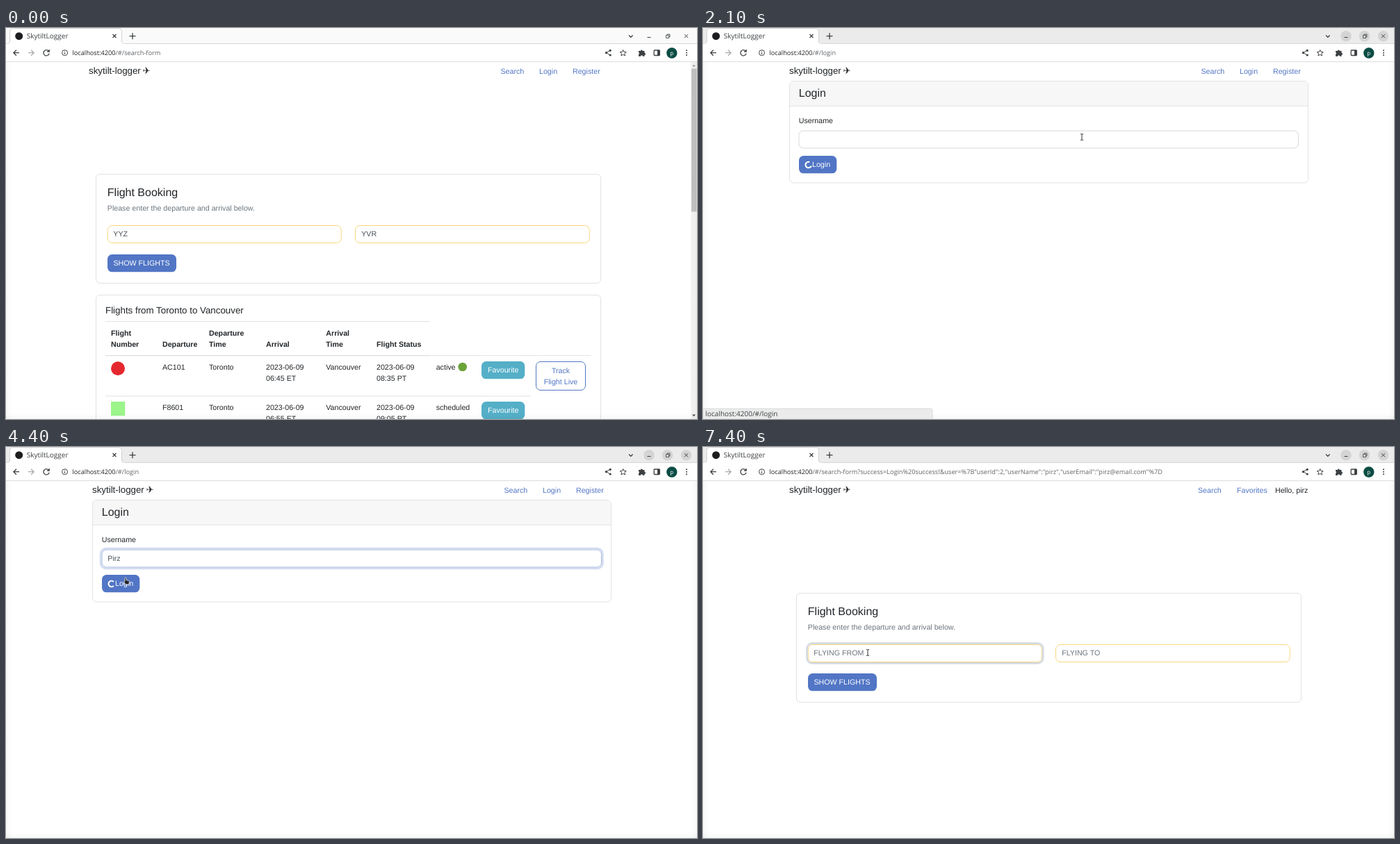
Recreate the animation shown at these times as an HTML page. Size 994 by 563 pixels, loop 8000 ms.

```html
<!DOCTYPE html>
<html lang="en">
<head>
<meta charset="utf-8">
<title>SkytiltLogger</title>
<style>
  html, body { margin: 0; width: 100%; height: 100%; overflow: hidden; background: #fff; }
  svg { display: block; }
  text { font: 10.667px "Liberation Sans", Arial, sans-serif; fill: #212529; white-space: pre; text-rendering: geometricPrecision; }
  .b { font-weight: 700; }
  .h4 { font-size: 16px; }
  .h5 { font-size: 13.333px; }
  .plane { font: 13.333px "DejaVu Sans", sans-serif; }
  .link { fill: #5276c5; }
  .link.on { fill: #32487a; }
  .muted { fill: #6c757d; }
  .field { fill: #495057; }
  .white { fill: #fff; }
  .mid { text-anchor: middle; }
  .ui { font: 10px "Open Sans", "Noto Sans", sans-serif; fill: #3c4043; }
  .url { font-size: 9.2px; fill: #5f6368; }
  .host { fill: #202124; }
  .ico { fill: none; stroke: #3c4043; stroke-width: 1.3; }
</style>
</head>
<body>
<svg id="stage" width="994" height="563" viewBox="0 0 994 563"></svg>
<script>
const LOOP = 8000, STEP = 100, BLUE = '#5276c5', LINE = '#dfe2e6';

const esc = s => s.replace(/&/g, '&amp;');
const text = (x, y, s, cls = '', more = '') => `<text x="${x}" y="${y}" class="${cls}" ${more}>${esc(s)}</text>`;
const box = (x, y, w, h, r, fill, stroke = 'none', more = '') =>
  `<rect x="${x}" y="${y}" width="${w}" height="${h}" rx="${r}" fill="${fill}" stroke="${stroke}" ${more}/>`;
const dot = (x, y, r, fill) => `<circle cx="${x}" cy="${y}" r="${r}" fill="${fill}"/>`;
const icon = (d, more = '') => `<path class="ico" d="${d}" ${more}/>`;
const line = (x1, x2, y, color = LINE) => `<path d="M${x1} ${y}H${x2}" stroke="${color}"/>`;
const group = (id, s, more = '') => `<g id="${id}" ${more}>${s}</g>`;
const ring = (id, x, y, w, h, color) =>
  box(x - 1.33, y - 1.33, w + 2.66, h + 2.66, 7.5, 'none', color, `id="${id}" stroke-width="2.67"`);

function browser() {
  const winX = [925, 951.5, 978.5];
  return box(0, 0, 994, 23, 0, '#fafafa', 'none', 'id="strip"') +
    box(0, 23, 994, 26, 0, '#fff') + line(0, 994, 22.5, '#d6d6d6') + line(0, 994, 48.5, '#dcdcdc') +
    `<path d="M1 23.2Q5.5 23 5.5 18V5.500Q5.500 .5 10.500 .5H161.500Q166.500 .5 166.500 5.500V18Q166.500 23 171 23.200" fill="#fff" stroke="#d0d0d0"/>` +
    box(1, 22.600, 170, 2, 0, '#fff') +
    dot(18.700, 11.700, 5.500, '#1d1d1f') + text(29.700, 15.300, 'SkytiltLogger', 'ui') +
    icon('M153.500 9l5 5m0-5l-5 5') + icon('M177.500 11.700h9m-4.500-4.500v9', 'stroke-width="1.500"') +
    icon('M896 10.500l2.800 2.800 2.800-2.800') +
    group('disks', winX.map(x => dot(x, 11.700, 7.700, '#d4d4d4')).join('')) +
    icon('M922.500 13.500h5M976 9.200l5 5m0-5l-5 5', 'style="stroke-width:1"') +
    icon('M949.500 10.500h4v4h-4zM951 10V9h4v4h-1', 'style="stroke-width:.8"') +
    icon('M19 35.700h-8m3.900-4l-4 4 4 4') +
    icon('M32 35.700h8m-3.900-4l4 4-4 4', 'style="stroke:#a9abae"') +
    icon('M61.300 33.200a4.100 4.100 0 1 0 .8 3.500M62.200 31v3h-3') +
    icon('M88.600 35.700a4 4 0 1 1-8 0a4 4 0 1 1 8 0M84.600 35v3m0-4.900v1', 'style="stroke-width:1"') +
    icon('M869 32.300l-5.500 3.300 5.500 3.400', 'style="stroke-width:1"') +
    dot(869.200, 32.300, 1.600, '#3c4043') + dot(863.400, 35.700, 1.600, '#3c4043') + dot(869.200, 39, 1.600, '#3c4043') +
    icon('M887.700 31.500l1.300 2.900 3.200.3-2.400 2.100.7 3.100-2.800-1.600-2.800 1.600.7-3.100-2.400-2.100 3.200-.3z', 'style="stroke-width:1"') +
    '<path d="M910 33h2.800a1.500 1.500 0 0 1 3 0h2.700v2.700a1.500 1.500 0 0 1 0 3v2H916a1.500 1.500 0 0 0-3 0h-3v-2.800a1.500 1.500 0 0 0 0-2.800z" fill="#3c4043"/>' +
    box(932.200, 32, 8, 7.500, .8, 'none', '#3c4043', 'stroke-width="1.300"') + box(937, 32, 3.500, 7.500, 0, '#3c4043') +
    dot(957.800, 36, 7.700, '#0b4c43') + text(957.800, 38.600, 'p', 'ui mid', 'style="font-size:8px;fill:#fff"') +
    [32.300, 35.700, 39.100].map(y => dot(979, y, 1, '#3c4043')).join('') +
    '<text id="url" class="ui url" x="95.500" y="39"></text>';
}

const brand = () => text(119, 66.200, 'skytilt-logger', 'h5') + text(196.500, 66.200, '✈', 'plane');

const guestNav = () => brand() + text(711.500, 66, 'Search', 'link') +
  text(767, 66, 'Login', 'link', 'data-login') + text(815, 66, 'Register', 'link');

const userNav = () => brand() + text(707, 66, 'Search', 'link') +
  text(763, 66, 'Favorites', 'link') + text(818, 66, 'Hello, pirz');

const formCard = (from, to, cls) =>
  box(129.500, 210.500, 726, 157, 5.500, '#fff', LINE) +
  text(145.800, 242, 'Flight Booking', 'h4') +
  text(145.800, 263.200, 'Please enter the departure and arrival below.', 'muted') +
  box(146.300, 284.500, 336, 25, 6.500, '#fff', '#f9d77e') + box(502.500, 284.500, 336.700, 25, 6.500, '#fff', '#f9d77e') +
  text(154.300, 300.200, from, cls) + text(511.200, 300.200, to, cls) +
  box(146, 326, 99, 25.300, 6.500, BLUE) + text(154.500, 342.200, 'SHOW FLIGHTS', 'white');

function flightRow(y, code, leave, land, status) {
  const cells = [[225, code], [292, 'Toronto'], [374, '2023-06-09'], [460.300, 'Vancouver'], [533, '2023-06-09']];
  return cells.map(([x, s]) => text(x, y, s)).join('') +
    text(374, y + 16, leave) + text(533, y + 16, land) + text(618.700, y, status) +
    box(684, y - 12, 62.300, 25.300, 6.500, '#54afc7') + text(693, y + 4.300, 'Favourite', 'white');
}

function results() {
  const heads = [[151, 'Flight', 'Number'], [225, '', 'Departure'], [292, 'Departure', 'Time'],
    [374, '', 'Arrival'], [460.300, 'Arrival', 'Time'], [533, '', 'Flight Status']];
  return box(129.500, 384.500, 726, 220, 5.500, '#fff', LINE) +
    text(143, 411, 'Flights from Toronto to Vancouver', 'h5') +
    line(143, 610, 422.500) + line(143, 610, 471.700, '#d2d5d9') + line(610, 841.500, 471.700) + line(143, 755, 530) +
    heads.map(([x, a, b]) => text(x, 442.500, a, 'b') + text(x, 458.700, b, 'b')).join('') +
    flightRow(492, 'AC101', '06:45 ET', '08:35 PT', 'active') +
    flightRow(550, 'F8601', '06:55 ET', '09:05 PT', 'scheduled') +
    dot(161, 490.300, 10, '#e5282f') + box(151, 538, 20.300, 20.300, 0, '#9bf58a') +
    dot(656.700, 488, 6.300, '#6aa339') +
    box(762.500, 480.500, 71, 41, 6.500, '#fff', BLUE) +
    text(798, 496.500, 'Track', 'link mid') + text(798, 512.700, 'Flight Live', 'link mid');
}

const scrollbar = () => box(985, 49, 9, 514, 0, '#f3f3f3') + box(986, 58.500, 7.500, 206, 0, '#c1c1c1') +
  '<path d="M987 55.500h5l-2.500-3z" fill="#a3a3a3"/><path d="M987 556.500h5l-2.500 3z" fill="#505050"/>';

const loginPage = () => guestNav() +
  box(119.500, 76.500, 746, 146.500, 5.500, '#fff', LINE) +
  '<path d="M120 112V82q0-5 5-5h735q5 0 5 5v30z" fill="#f7f7f7"/>' + line(119.500, 865.500, 112.300) +
  text(132.800, 99.200, 'Login', 'h4') + text(132.800, 137.300, 'Username') +
  ring('nameRing', 132.500, 147.500, 719.500, 26, '#d3dcf0') +
  box(133, 148, 718.500, 25, 6.500, '#fff', '#d5d9de', 'id="nameBox"') +
  text(141.300, 163.500, '', 'field', 'id="name"') + box(141.300, 154, .8, 12, 0, '#333', 'none', 'id="caret"') +
  ring('btnRing', 133, 184, 54.300, 25.300, '#c3cfea') +
  box(133, 184, 54.300, 25.300, 6.500, BLUE) + text(152, 200.200, 'Login', 'white') +
  '<g transform="translate(146.800 197)"><path id="spin" d="M3.020 3.020A4.270 4.270 0 1 1 3.020-3.020" fill="none" stroke="#fff" stroke-width="2.130"/></g>';

const homePage = () => userNav() +
  formCard('FLYING FROM', 'FLYING TO', 'muted') +
  ring('fromRing', 145.800, 284, 337, 26, '#d4dae3') +
  box(154, 291, .9, 12, 0, '#333', 'none', 'id="fromCaret"');

// pointer shapes have their hot spot at 0,0
const pointers =
  '<path id="arrow" d="M0 0V9.200L2.100 7.300 3.600 10.600 5.200 9.900 3.700 6.700H6.400Z" fill="#222" stroke="#fff" stroke-width=".7"/>' +
  '<path id="hand" d="M-1 .8Q0-.6 1 .8V4L4.600 4.800Q5.600 5.200 5.400 6.500L4.700 10.200H0L-2.300 6.400Q-2.400 5.200-1 5.800Z" fill="#222" stroke="#fff" stroke-width=".7"/>' +
  '<path id="beam" d="M-2-4.500Q0-4.500 0-3.500Q0-4.500 2-4.500M0-3.800V3.800M-2 4.500Q0 4.500 0 3.500Q0 4.500 2 4.500" fill="none" stroke="#333" stroke-width="1"/>';

const shade = ['0 0 0 1 8', '1 0 0 0 8', '0 1 0 0 8'].map((s, i) => {
  const [x1, y1, x2, y2] = [[0, 0, 1, 0], [1, 0, 0, 0], [0, 1, 0, 0]][i];
  const [x, y, w, h] = [[0, 49, 9, 514], [985, 49, 9, 514], [0, 554, 994, 9]][i];
  return `<linearGradient id="s${i}" x1="${x1}" y1="${y1}" x2="${x2}" y2="${y2}"><stop stop-opacity=".03"/><stop offset="1" stop-opacity="0"/></linearGradient>` +
    box(x, y, w, h, 0, `url(#s${i})`);
}).join('');

const $ = id => document.getElementById(id);
$('stage').innerHTML = box(0, 0, 994, 563, 0, '#fff') +
  group('search', guestNav() + formCard('YYZ', 'YVR', 'field') + results() + scrollbar()) +
  group('login', loginPage(), 'transform="translate(5 0)"') +
  group('home', homePage(), 'transform="translate(5 0)"') +
  shade + browser() +
  group('status', box(-4, 548, 116, 20, 3, '#f4f4f4', '#d9d9d9', 'id="bubble"') + text(3.500, 559.200, 'localhost:4200/#/login', 'ui')) +
  group('pointer', pointers);

// time, x, y, shape
const path = [
  [100, 984, 131, 'arrow'], [200, 640, 118, 'arrow'], [300, 275, 96, 'arrow'], [400, 450, 54, 'arrow'],
  [500, 690, 61, 'arrow'], [600, 792.500, 65.500, 'hand'], [700, 792.500, 65.500, 'hand'], [800, 789.800, 66.500, 'hand'],
  [1600, 789.800, 66.500, 'hand'], [1700, 770, 78, 'arrow'], [2100, 545, 157, 'beam'], [2300, 509, 159, 'beam'],
  [4000, 509, 159, 'beam'], [4200, 260, 176, 'arrow'], [4300, 172, 188, 'hand'], [4900, 171.700, 186, 'arrow'],
  [5800, 171.700, 186, 'arrow'], [6000, 171.500, 187, 'arrow'], [6100, 171.500, 187, 'arrow'],
  [6500, 222, 272, 'arrow'], [6600, 232, 289, 'beam'], [6800, 237, 296, 'beam'], [LOOP, 237, 296, 'beam']
];
const typed = [3100, 3300, 3500, 3800];
const urls = {
  search: '/#/search-form',
  login: '/#/login',
  home: '/#/search-form?success=Login%20success!&user=%7B"userId":2,"userName":"pirz","userEmail":"pirz@email.com"%7D'
};

const show = (id, on) => { $(id).style.display = on ? '' : 'none'; };
const set = (id, key, value) => $(id).setAttribute(key, value);
const within = (t, a, b) => t >= a && t < b;

function pointerAt(t) {
  const i = path.findIndex(p => p[0] > t);
  const a = path[i - 1], b = path[i];
  if (!a) return null;
  const k = (t - a[0]) / (b[0] - a[0]);
  return [a[1] + (b[1] - a[1]) * k, a[2] + (b[2] - a[2]) * k, a[3]];
}

let page = '', last = -1;
function draw(t) {
  const now = t < 1300 ? 'search' : t < 4900 ? 'login' : 'home';
  if (now !== page) {
    page = now;
    for (const id in urls) show(id, id === page);
    $('url').innerHTML = '<tspan class="host">localhost</tspan><tspan class="host">:4200</tspan>' + esc(urls[page]);
  }
  const active = t >= 1300;
  show('disks', active);
  set('strip', 'fill', active ? '#ebebeb' : '#fafafa');

  show('status', within(t, 800, 2200));
  $('status').style.opacity = t === 800 ? .5 : 1;
  set('bubble', 'width', t < 1400 ? 116 : 334);
  set('bubble', 'fill', active ? '#ebebeb' : '#f4f4f4');
  document.querySelectorAll('[data-login]').forEach(e => e.classList.toggle('on', within(t, 600, 1700)));

  const count = typed.filter(k => t >= k).length;
  const focused = within(t, 2300, 4800);
  const since = t - (count ? typed[count - 1] : 2300);
  $('name').textContent = 'Pirz'.slice(0, count);
  show('nameRing', focused);
  set('nameBox', 'stroke', focused ? '#a9bae2' : '#d5d9de');
  show('caret', focused && since % 1000 < 500);
  set('caret', 'x', 141.300 + (count ? $('name').getComputedTextLength() : 0));
  show('btnRing', t >= 4800);
  set('spin', 'transform', `rotate(${(t - 1400) / 750 * 360})`);

  show('fromRing', t >= 6800);
  show('fromCaret', within(t, 6900, 7400));

  const p = pointerAt(t);
  show('pointer', p);
  if (p) {
    set('pointer', 'transform', `translate(${p[0]} ${p[1]})`);
    for (const s of ['arrow', 'hand', 'beam']) show(s, s === p[2]);
  }
}

const start = performance.now();
function tick() {
  const t = Math.floor((performance.now() - start) % LOOP / STEP) * STEP;
  if (t !== last) draw(last = t);
  requestAnimationFrame(tick);
}
tick();
</script>
</body>
</html>
```
